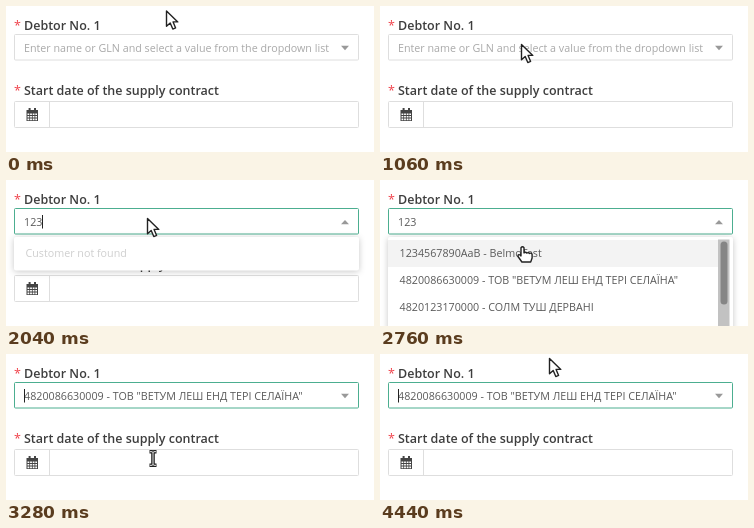
Animation, 368 px wide and 146 px high, one loop 4460 ms. Source, as an HTML page:

```html
<!DOCTYPE html>
<html lang="en">
<head>
<meta charset="utf-8">
<title>Debtor form</title>
<style>
html, body { margin: 0; width: 100%; height: 100%; overflow: hidden; background: #fff; }
svg { display: block; width: 368px; height: 146px; }
text { font: 10.73px "Open Sans", sans-serif; fill: #5a5a5a; white-space: pre; }
.label { font-size: 12.5px; font-weight: 600; fill: #3d3d3d; }
.star { font-size: 12.5px; fill: #f0454e; }
.hint { fill: #a9a9a9; }
.faint { fill: #cfcfcf; }
.panel { filter: drop-shadow(0 1px 3px rgba(0, 0, 0, .22)); }
</style>
</head>
<body>
<svg viewBox="0 0 368 146">
  <rect width="368" height="146" fill="#fff"/>

  <text class="star" x="8" y="23.5">*</text>
  <text class="label" x="18" y="23.5">Debtor No. 1</text>
  <rect id="box" x="8.5" y="28.5" width="344" height="25.5" rx="1" fill="#fff" stroke="#dedede"/>
  <text id="value" x="18" y="46"></text>
  <path id="chevron" fill="#999"/>
  <rect id="caret" y="35" width="1" height="13.5" fill="#222"/>

  <text class="star" x="8" y="89">*</text>
  <text class="label" x="18" y="89">Start date of the supply contract</text>
  <rect x="8.5" y="95.5" width="344" height="26" rx="1" fill="#fff" stroke="#dedede"/>
  <path d="M43.5 96V121" stroke="#dedede"/>
  <g fill="#444">
    <path d="M20.5 104h11.5v11h-11.5z"/>
    <path d="M22.6 102h2v3h-2zM28 102h2v3h-2z"/>
    <path d="M21.5 108.2h9.5M21.5 110.8h9.5M21.5 113.4h9.5" stroke="#fff" stroke-width="1.6" stroke-dasharray="1.8 .8"/>
  </g>

  <g id="panel" class="panel">
    <rect id="sheet" x="8" y="57" width="345" rx="2" fill="#fff"/>
    <text id="note" class="faint" x="19.5" y="77"></text>
    <g id="list">
      <rect id="hover" x="8" width="330" height="27" fill="#f3f3f3"/>
      <g id="rows"></g>
      <rect x="338" y="59.5" width="11.5" height="90" fill="#c2c2c2"/>
      <rect x="340.5" y="61.5" width="7" height="63" rx="3.5" fill="#858585"/>
    </g>
  </g>

  <g id="pointer" stroke-linejoin="round">
    <path id="arrow" d="M.5 .5V15.8L4.2 12.4 6.8 18.6 9.6 17.4 7.1 11.4H11.8Z" fill="#fff" stroke="#222" stroke-width="1.4"/>
    <path id="hand" d="M-1.5 1.2Q0-.8 1.5 1.2V6.4Q3 4.9 4.2 6.6 5.8 5.4 6.9 7 8.6 6 9.6 7.8V11.5L8.2 15.5H-.6L-4.5 10Q-4.7 7.6-2.7 8.3L-1.5 9.4Z" fill="#fff" stroke="#222" stroke-width="1.4"/>
    <g id="beam" fill="none">
      <path d="M-3.5-6.8H-1L0-6 1-6.8H3.5M0-6V6M-3.5 6.8H-1L0 6 1 6.8H3.5" stroke="#222" stroke-width="3.6"/>
      <path d="M-3-6.8H-1L0-6 1-6.8H3M0-6V6M-3 6.8H-1L0 6 1 6.8H3" stroke="#fff" stroke-width=".9"/>
    </g>
  </g>
</svg>
<script>
const LOOP = 4460;
const OPEN = 1180, FOUND = 2300, PICK = 3080;
const KEYS = [1700, 1820, 1940];
const PROMPT = 'Enter name or GLN and select a value from the dropdown list';
const OPTIONS = [
  '1234567890AaB - BelmoTest',
  '4820086630009 - ТОВ "ВЕТУМ ЛЕШ ЕНД ТЕРІ СЕЛАЇНА"',
  '4820123170000 - СОЛМ ТУШ ДЕРВАНІ'
];
// time, x, y
const PATH = [
  [0, 160, 4.5], [560, 160, 4.5], [940, 141, 38], [2380, 141, 38],
  [2700, 142.5, 66.5], [2780, 142.5, 66.5], [3020, 144, 100], [3100, 144, 100],
  [3260, 147, 104.5], [3360, 147, 104.5], [3840, 169, 4]
];
const CARET_ON = [[OPEN, 1690], [1700, 2440], [2960, 3640], [4300, LOOP]];

const $ = id => document.getElementById(id);
const clamp = v => Math.min(1, Math.max(0, v));
const smooth = v => v * v * (3 - 2 * v);
const show = (id, on) => $(id).style.display = on ? '' : 'none';
const set = (id, attrs) => {
  for (const k in attrs) $(id).setAttribute(k, attrs[k]);
};
const write = (id, s) => {
  if ($(id).textContent !== s) $(id).textContent = s;
};

OPTIONS.forEach((s, i) => {
  const row = document.createElementNS('http://www.w3.org/2000/svg', 'text');
  row.setAttribute('x', 19.5);
  row.setAttribute('y', 77 + 27 * i);
  row.textContent = s;
  $('rows').append(row);
});

function pointerAt(t) {
  let i = PATH.length - 1;
  while (PATH[i][0] > t) i--;
  const a = PATH[i], b = PATH[i + 1] || a;
  const p = b === a ? 0 : smooth((t - a[0]) / (b[0] - a[0]));
  return [a[1] + (b[1] - a[1]) * p, a[2] + (b[2] - a[2]) * p];
}

function drawField(t) {
  const typed = '123'.slice(0, KEYS.filter(k => t >= k).length);
  const picked = t >= PICK;
  const open = t >= OPEN && !picked;
  const text = picked ? OPTIONS[1] : typed || PROMPT;
  write('value', text);
  set('value', { class: text === PROMPT ? 'hint' : '' });

  const g = smooth(clamp((t - OPEN) / 200));
  const mix = (a, b) => Math.round(a + (b - a) * g);
  set('box', { stroke: `rgb(${mix(222, 76)},${mix(222, 174)},${mix(222, 144)})` });
  set('chevron', { d: open ? 'M335 44.3H343L339 40Z' : 'M335 39.8H343L339 44.2Z' });

  const width = open && typed ? $('value').getComputedTextLength() : 0;
  set('caret', { x: 18 + Math.round(width) });
  show('caret', CARET_ON.some(([a, b]) => t >= a && t < b));
}

function drawPanel(t, y) {
  const vis = smooth(clamp((t - OPEN) / 180)) * (1 - smooth(clamp((t - PICK) / 140)));
  const found = t >= FOUND;
  show('panel', vis > 0);
  set('panel', {
    opacity: vis,
    transform: `translate(0 57) scale(1 ${0.8 + 0.2 * vis}) translate(0 -57)`
  });
  set('sheet', { height: found ? 110 : 33.5 });
  show('note', !found);
  show('list', found);
  write('note', t < 2000 ? PROMPT : 'Customer not found');
  set('hover', { y: y > 87 ? 87 : 60 });
}

function drawPointer(t, x, y) {
  const hand = t >= FOUND && t < PICK + 60 && y > 58;
  const beam = t >= PICK + 60 && y > 95;
  set('pointer', { transform: `translate(${x} ${y})` });
  show('hand', hand);
  show('beam', beam);
  show('arrow', !hand && !beam);
}

function draw(t) {
  const [x, y] = pointerAt(t);
  drawField(t);
  drawPanel(t, y);
  drawPointer(t, x, y);
}

const start = performance.now();
function tick() {
  draw((performance.now() - start) % LOOP);
  requestAnimationFrame(tick);
}
tick();
</script>
</body>
</html>
```
